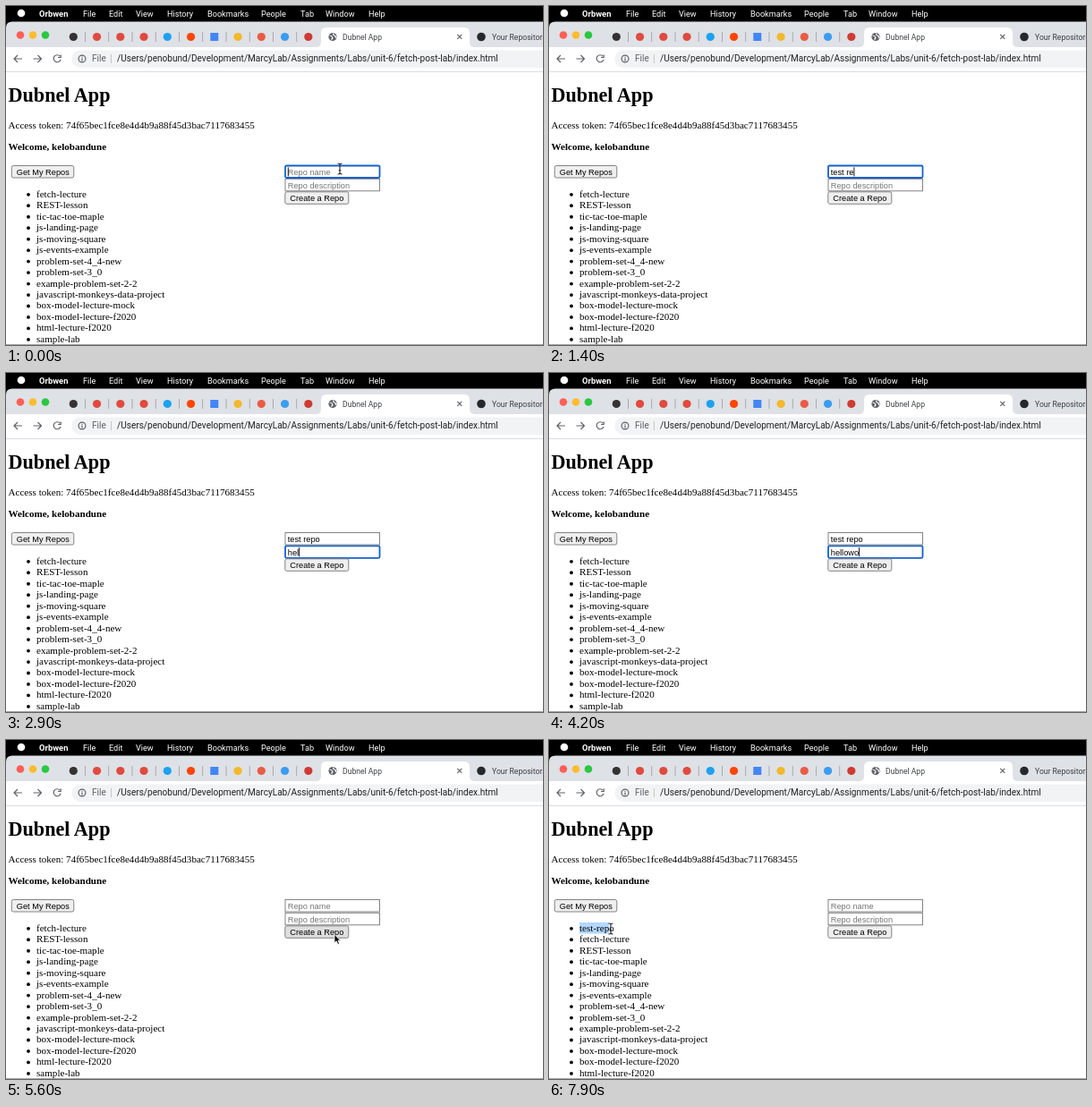
Recreate the animation shown at these times as an HTML page. Size 600 px wide and 379 px high, loop 8000 ms.

```html
<!DOCTYPE html>
<html lang="en">
<head>
<meta charset="utf-8">
<title>Repo form demo</title>
<style>
  html, body { margin: 0; width: 100%; height: 100%; overflow: hidden; background: #fff; }
  svg { display: block; width: 600px; height: 379px; }
  text { white-space: pre; }
  .ui { font-family: Roboto, sans-serif; }
  .page { font: 11.09px "Liberation Serif", serif; }
  .control { font: 9.24px "Liberation Sans", sans-serif; }
  .bold { font-weight: bold; }
  .line { fill: none; stroke: #5f6368; stroke-width: 1.2; }
</style>
</head>
<body>
<svg id="stage" viewBox="0 0 600 379">
  <rect width="600" height="379" fill="#fff"/>
  <g id="window" class="ui">
    <rect width="600" height="26" fill="#000"/>
    <circle cx="17" cy="8" r="4.3" fill="#fff"/>
    <path d="M0 46V24Q0 17.5 7 17.5H600V46Z" fill="#dee1e6"/>
    <path d="M346 46Q352 46 352 40V30Q352 24 358 24H512Q518 24 518 30V40Q518 46 524 46Z" fill="#fff"/>
    <path d="M600 49.5H83a9.7 9.7 0 0 0 0 19.4H600Z" fill="#f1f3f4"/>
    <path d="M0 73.5H600" stroke="#dadce0"/>
    <path class="line" d="M18 59H9M13 55L9 59L13 63"/>
    <path class="line" d="M30.5 59H39.5M35.5 55L39.5 59L35.5 63"/>
    <path class="line" d="M60.3 56.2A4 4 0 1 0 61 60M61.2 54.5V57.5H58"/>
    <circle class="line" cx="85" cy="59" r="3.9"/>
    <path class="line" d="M85 56.7V57.7M85 58.6V61.4"/>
    <path d="M117.5 54V64" stroke="#c4c7cb"/>
    <circle cx="365" cy="34.5" r="4.6" fill="#5f6368"/>
    <path d="M361.5 33q2 0 3 1.5t-1 3M366 30.5q-1 2 1 2.5t1.5 3" fill="none" stroke="#fff" stroke-width="1.2"/>
    <path class="line" d="M504.3 31.8l5 5m0-5l-5 5"/>
    <circle cx="531" cy="34.5" r="4.8" fill="#24292e"/>
  </g>
  <g id="page" class="page"></g>
  <g id="form" class="control"></g>
  <path d="M0 378.5H600" stroke="#a6a6a6"/>
  <path id="arrow" d="M0 0V9.3L2.2 7.3L3.8 10.9L5.5 10.1L3.9 6.7H6.7Z" fill="#000" stroke="#fff" stroke-width=".8"/>
  <path id="beam" d="M-2.5 -6Q0 -6 0 -4.5Q0 -6 2.5 -6M0 -4.5V4.5M-2.5 6Q0 6 0 4.5Q0 6 2.5 6M-1.3 1.8H1.3" fill="none" stroke="#222" stroke-width="1.1"/>
</svg>
<script>
const $ = id => document.getElementById(id);

function add(parent, tag, attrs, content = "") {
  const node = document.createElementNS("http://www.w3.org/2000/svg", tag);
  for (const key in attrs) node.setAttribute(key, attrs[key]);
  node.textContent = content;
  return parent.appendChild(node);
}
const label = (parent, x, y, content, attrs = {}) => add(parent, "text", { x, y, ...attrs }, content);
const show = (node, visible) => node.setAttribute("visibility", visible ? "visible" : "hidden");

// Menu bar, tabs and address bar
const bar = $("window");
const menu = { File: 86, Edit: 115, View: 145, History: 180, Bookmarks: 225, People: 285, Tab: 329, Window: 357, Help: 405 };
label(bar, 37, 11.5, "Orbwen", { class: "bold", fill: "#fff", "font-size": 9.4 });
for (const name in menu) label(bar, menu[name], 11.5, name, { fill: "#fff", "font-size": 9.15 });

["#ff5f57", "#febc2e", "#28c840"].forEach((fill, i) =>
  add(bar, "circle", { cx: 16 + i * 14, cy: 32.5, r: 4.3, fill }));

["#333", "#e04a3f", "#e04a3f", "#e04a3f", "#1da1f2", "#ff4500", "#4285f4", "#f4b82a", "#ea5b45", "#3b9cf0", "#cf3a32"]
  .forEach((fill, i) => {
    const cx = 75.3 + i * 26.25;
    if (i === 6) add(bar, "rect", { x: cx - 4.5, y: 30, width: 9, height: 9, fill });
    else add(bar, "circle", { cx, cy: 34.5, r: 4.6, fill });
    if (i < 10) add(bar, "rect", { x: cx + 12.8, y: 29, width: 0.8, height: 11, fill: "#9a9da2" });
  });

label(bar, 376, 37.6, "Dubnel App", { fill: "#3c4043", "font-size": 8.6 });
label(bar, 543, 37.6, "Your Repositories", { fill: "#3c4043", "font-size": 8.6 });
label(bar, 96, 62.4, "File", { fill: "#5f6368", "font-size": 10.08 });
label(bar, 124, 62.4, "/Users/penobund/Development/MarcyLab/Assignments/Labs/unit-6/fetch-post-lab/index.html",
  { fill: "#202124", "font-size": 10.08 });

// Page text and repo list
const page = $("page");
label(page, 2.5, 107, "Dubnel App", { class: "bold", "font-size": 22.18 });
label(page, 2.5, 137, "Access token: 74f65bec1fce8e4d4b9a88f45d3bac7117683455");
label(page, 2.5, 161, "Welcome, kelobandune", { class: "bold" });

const ROW = 12.47, LIST_X = 34;
const repos = ["test-repo", "fetch-lecture", "REST-lesson", "tic-tac-toe-maple", "js-landing-page", "js-moving-square",
  "js-events-example", "problem-set-4_4-new", "problem-set-3_0", "example-problem-set-2-2",
  "javascript-monkeys-data-project", "box-model-lecture-mock", "box-model-lecture-f2020",
  "html-lecture-f2020", "sample-lab"];
const highlight = add(page, "rect", { x: LIST_X, y: 204, height: 12.5, fill: "#b3d7ff" });
const list = add(page, "g", {});
const items = repos.map((name, i) => {
  const row = add(list, "g", { transform: `translate(0 ${i * ROW})` });
  add(row, "circle", { cx: 25, cy: 210.8, r: 1.9 });
  return label(row, LIST_X, 213.8, name);
});

// Form controls
const form = $("form");
function button(x, y, width, content) {
  const box = add(form, "rect", { x, y, width, height: 13.5, rx: 2, fill: "#efefef", stroke: "#767676", "stroke-width": 0.9 });
  label(form, x + 5.5, y + 10.2, content);
  return box;
}
function field(y, placeholder) {
  const box = add(form, "rect", { x: 312, y, width: 105.5, height: 13.5, fill: "#fff" });
  const text = label(form, 314.8, y + 10.2, "");
  const caret = add(form, "rect", { y: y + 1.8, width: 0.9, height: 10.2 });
  return (value, focused) => {
    text.textContent = value || placeholder;
    text.setAttribute("fill", value ? "#000" : "#757575");
    box.setAttribute("stroke", focused ? "#1461cc" : "#767676");
    box.setAttribute("stroke-width", focused ? 1.8 : 0.9);
    box.setAttribute("rx", focused ? 1.5 : 0);
    caret.setAttribute("x", 314.8 + (value ? text.getComputedTextLength() : 0));
    show(caret, focused);
  };
}
button(6.3, 178.5, 69.5, "Get My Repos");
const setDescription = field(193.3, "Repo description");
const setName = field(178.5, "Repo name");
const createButton = button(311.8, 207.8, 71, "Create a Repo");

// Timeline in ms
const TAB = 2100, CLICK = 5500, LISTED = 6300, DRAG = 7500;
const nameKeys = [500, 600, 800, 900, 1000, 1200, 1300, 1500, 1700];
const descriptionKeys = [2400, 2600, 2800, 3200, 3500, 3800, 4100, 4400, 4600, 4800];
const pointer = [[0, 373, 182], [5000, 373, 182], [5400, 367, 217.5], [5900, 367, 217.5],
  [6700, 221, 235.5], [7300, 34, 211], [DRAG, 34, 211], [7900, 69, 211], [8000, 69, 211]];

const typed = (content, keys, t) => t < CLICK ? content.slice(0, keys.filter(k => k <= t).length) : "";

function pointerAt(t) {
  const i = pointer.findIndex(p => p[0] > t);
  const [t0, x0, y0] = pointer[i - 1], [t1, x1, y1] = pointer[i];
  const u = (t - t0) / (t1 - t0), ease = u * u * (3 - 2 * u);
  return [x0 + (x1 - x0) * ease, y0 + (y1 - y0) * ease];
}

// A letter joins the selection once the pointer passes its middle.
function selectedWidth(x) {
  let width = 0;
  for (let n = 1; n <= repos[0].length; n++) {
    const next = items[0].getSubStringLength(0, n);
    if (x - LIST_X < (width + next) / 2) break;
    width = next;
  }
  return width;
}

function draw(t) {
  setName(typed("test repo", nameKeys, t), t < TAB);
  setDescription(typed("helloworld", descriptionKeys, t), t >= TAB && t < CLICK);
  createButton.setAttribute("fill", t >= 5400 && t < 6000 ? "#dedede" : "#efefef");
  list.setAttribute("transform", `translate(0 ${t < LISTED ? -ROW : 0})`);
  show(list.firstChild, t >= LISTED);

  const [x, y] = pointerAt(t);
  const visible = t < 500 || t >= 5000;
  const overText = y < 206 || t >= 7200;
  for (const [id, on] of [["beam", overText], ["arrow", !overText]]) {
    $(id).setAttribute("transform", `translate(${x} ${y})`);
    show($(id), visible && on);
  }
  highlight.setAttribute("width", t >= DRAG ? selectedWidth(x) : 0);
}

const start = performance.now();
function tick() {
  draw(Math.floor((performance.now() - start) % 8000 / 100) * 100);
  requestAnimationFrame(tick);
}
tick();
</script>
</body>
</html>
```
